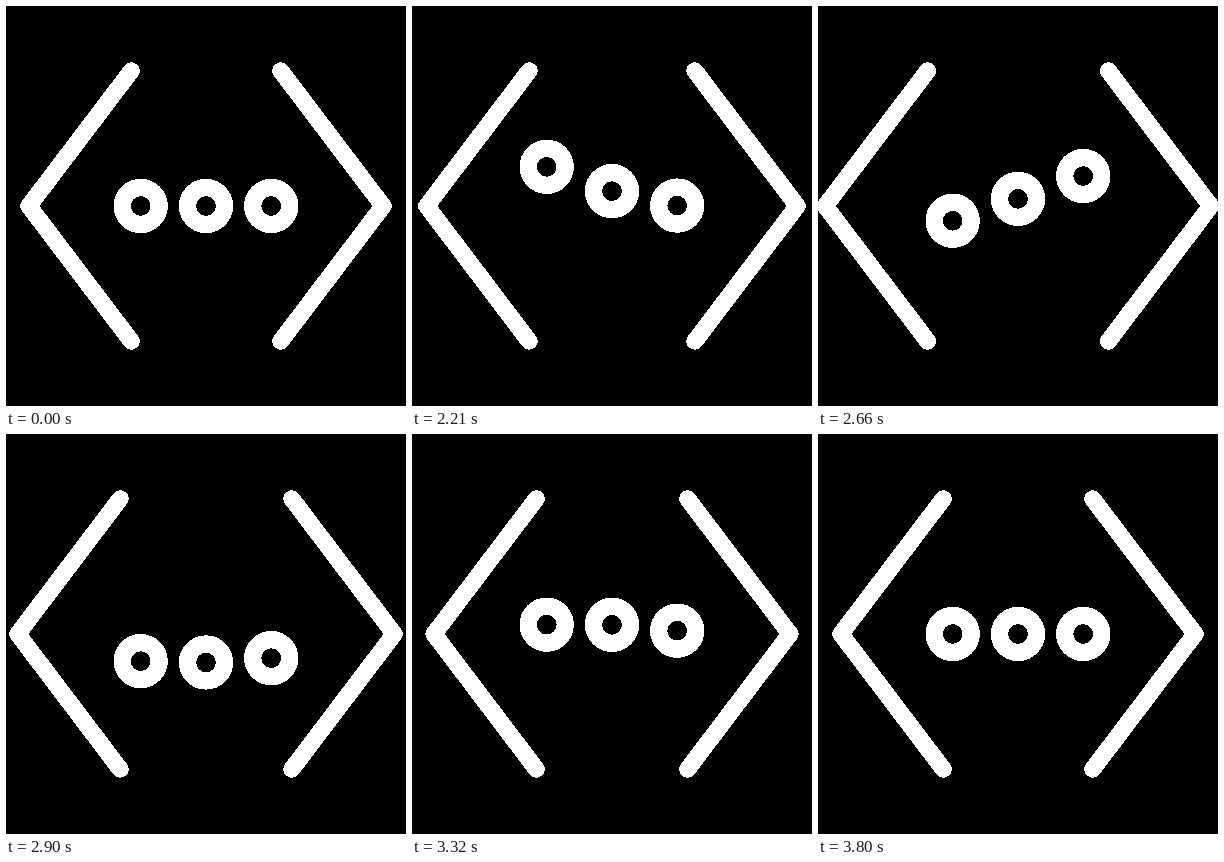
Recreate the animation shown at these times as an HTML page. Size 400 by 400 pixels, loop 3830 ms.

```html
<!DOCTYPE html>
<html lang="en">
<head>
<meta charset="utf-8">
<title>Bouncing dots in brackets</title>
<style>
  html, body { margin: 0; width: 100%; height: 100%; overflow: hidden; background: #000; }
  svg { display: block; width: 100%; height: 100%; fill: none; stroke: #fff; shape-rendering: crispEdges; }
  path { stroke-width: 17; stroke-linecap: round; stroke-linejoin: round; }
  circle { stroke-width: 17.3; }
</style>
</head>
<body>
<svg viewBox="0 0 400 400">
  <path id="left" d="M125.3 64.8L22.9 200L125.3 335.2"/>
  <path id="right" d="M274.7 64.8L377.1 200L274.7 335.2"/>
  <circle class="dot" cx="134.7" cy="200" r="18.5"/>
  <circle class="dot" cx="200" cy="200" r="18.5"/>
  <circle class="dot" cx="265.2" cy="200" r="18.5"/>
</svg>
<script>
const LOOP = 3830, REST = 2030, STEP = 30, STAGGER = 3;

const left = document.getElementById('left');
const right = document.getElementById('right');
const dots = document.querySelectorAll('.dot');

// Eased progress (0 to 1) of x between two steps
function ease(x, from, to) {
  const u = Math.min(Math.max((x - from) / (to - from), 0), 1);
  return u * u * u * (u * (6 * u - 15) + 10);
}

// The brackets open, then drift shut
const spread = x => 16.3 * (ease(x, 0, 14) - ease(x, 16, 51));

// Each dot jumps up, drops past its rest line, rebounds and settles
const bounce = x => -46.8 * ease(x, 0, 10) + 75.3 * ease(x, 10, 27.5)
  - 38 * ease(x, 27.5, 42.5) + 9.5 * ease(x, 42.5, 54);

function draw(now) {
  const t = now % LOOP;
  const step = t < REST ? 0 : Math.floor((t - REST) / STEP) + 1;
  const gap = spread(step);
  left.setAttribute('transform', `translate(${-gap})`);
  right.setAttribute('transform', `translate(${gap})`);
  dots.forEach((dot, i) => dot.setAttribute('cy', 200 + bounce(step - i * STAGGER)));
}

const start = performance.now();
function tick() {
  draw(performance.now() - start);
  requestAnimationFrame(tick);
}
tick();
</script>
</body>
</html>
```
